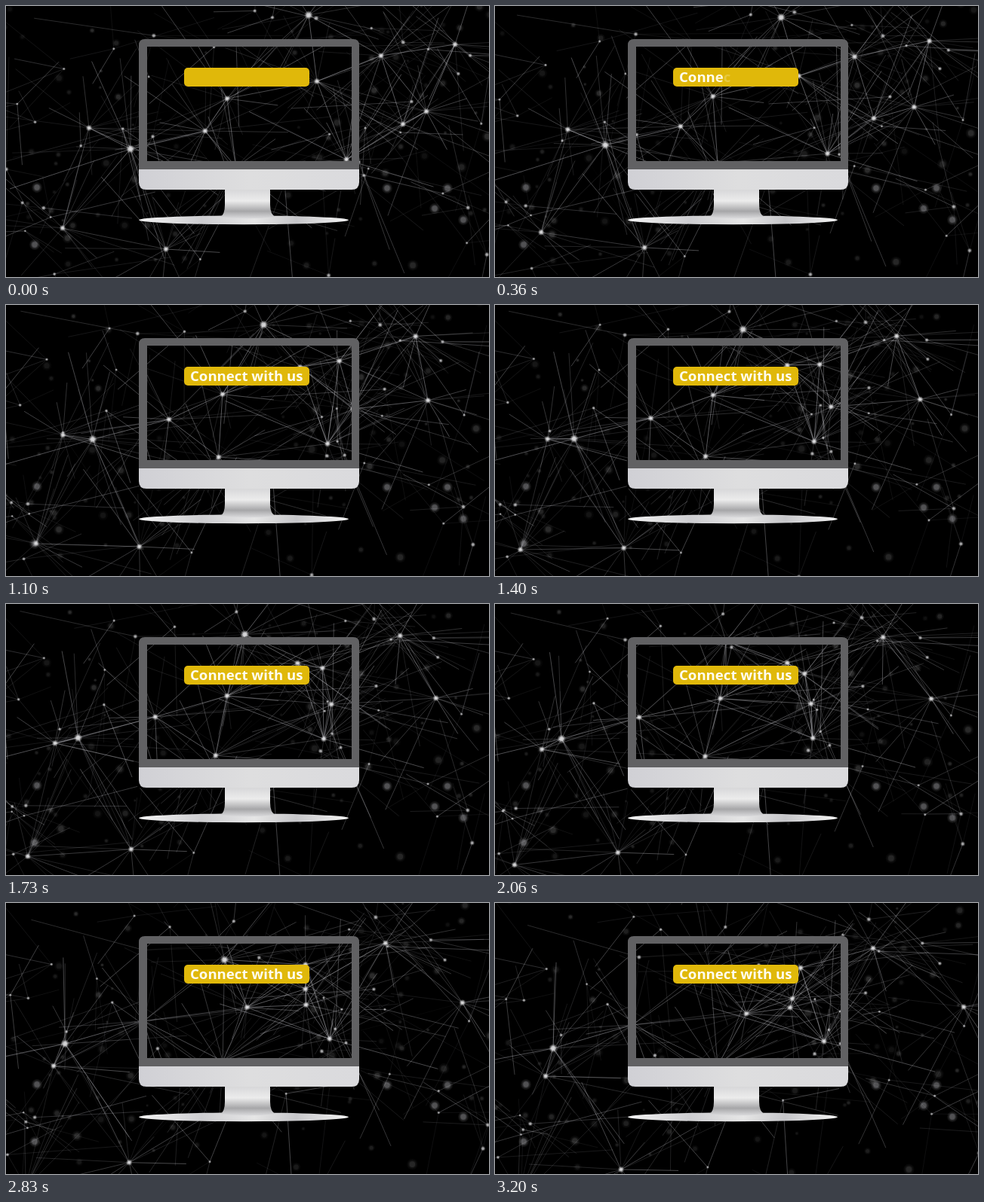
These frames come from a looping animation (640x360 px, 3.27 s). An HTML page with a canvas:

```html
<!DOCTYPE html>
<html lang="en">
<head>
<meta charset="utf-8">
<title>Connect with us</title>
<style>
  html, body { margin: 0; width: 100%; height: 100%; overflow: hidden; background: #000; }
  canvas, svg { position: absolute; left: 0; top: 0; width: 640px; height: 360px; display: block; }
  text { font: 700 18.6px "Open Sans", "Noto Sans", sans-serif; fill: #fffdf0; }
</style>
</head>
<body>
<canvas id="net" width="640" height="360"></canvas>
<svg viewBox="0 0 640 360">
  <defs>
    <linearGradient id="chin">
      <stop offset="0" stop-color="#d0d0d5"/>
      <stop offset=".5" stop-color="#dededf"/>
      <stop offset="1" stop-color="#dadadd"/>
    </linearGradient>
    <linearGradient id="neck" x2="0" y2="1">
      <stop offset="0" stop-color="#d6d6d8"/>
      <stop offset=".4" stop-color="#ececec"/>
      <stop offset=".75" stop-color="#a6a6a8"/>
      <stop offset="1" stop-color="#dcdcde"/>
    </linearGradient>
    <linearGradient id="base">
      <stop offset="0" stop-color="#f4f4f4"/>
      <stop offset=".3" stop-color="#cdcdd0"/>
      <stop offset=".55" stop-color="#e6e6e6"/>
      <stop offset=".75" stop-color="#c6c6c9"/>
      <stop offset="1" stop-color="#f4f4f4"/>
    </linearGradient>
  </defs>
  <ellipse cx="315" cy="284.3" rx="139" ry="5.9" fill="url(#base)"/>
  <path d="M290 243H350V264Q350 277 357 280Q320 285 284 280Q290 277 290 264Z" fill="url(#neck)"/>
  <path fill="#616163" fill-rule="evenodd"
    d="M176 217V52Q176 44 184 44H460Q468 44 468 52V217ZM187 54V206H458V54Z"/>
  <path d="M176 217H468V234Q468 244 458 244H186Q176 244 176 234Z" fill="url(#chin)"/>
  <rect x="236" y="82" width="166" height="25" rx="5" fill="#e0b80a"/>
  <text id="label" x="244" y="101" xml:space="preserve"></text>
</svg>
<script>
const LOOP = 3270, END = 3200;
const ctx = document.getElementById('net').getContext('2d');
const label = document.getElementById('label');

let seed = 73;
const rnd = () => (seed = (seed * 16807) % 2147483647) / 2147483647;
const spread = r => (rnd() * 2 - 1) * r;
const clamp = v => Math.max(0, Math.min(1, v));

// Bright hubs: start and end of each path
const hubs = [
  [165, 190, 77, 193], [401, 12, 285, 90], [264, 166, 182, 162],
  [557, 140, 621, 138], [595, 51, 501, 60], [526, 157, 391, 139],
  [110, 162, 67, 230], [451, 204, 436, 184], [75, 295, 30, 395],
  [497, 66, 394, 127], [293, 123, 333, 147], [412, 100, 405, 86],
  [305, 214, 295, 216], [212, 323, 167, 354]
].map(([x, y, x2, y2], i) => ({ x, y, dx: x2 - x, dy: y2 - y, r: i < 2 ? 3.6 : 2.6, rays: 13 }));

const minor = Array.from({ length: 44 }, () => ({
  x: rnd() * 640, y: rnd() * 360, dx: spread(60) - 15, dy: spread(40),
  r: 1.1 + rnd() * 1.1, rays: 4
}));

const nodes = [...hubs, ...minor];

// Long thin lines fanning out of every node
const rays = nodes.flatMap(from => Array.from({ length: from.rays }, () => {
  const angle = rnd() * 2 * Math.PI, len = 50 + rnd() * 130;
  return {
    from, x: from.x + len * Math.cos(angle), y: from.y + len * .85 * Math.sin(angle),
    dx: from.dx * .6 + spread(35), dy: from.dy * .6 + spread(25),
    alpha: (from.rays > 4 ? .16 : .1) + rnd() ** 2 * .38
  };
}));

const blobs = Array.from({ length: 90 }, (_, i) => ({
  x: (i % 2 ? 500 : 130) + spread(150), y: 175 + spread(175),
  dx: spread(30), dy: spread(16), r: 1.5 + rnd() * 3.5, alpha: .08 + rnd() * .16
}));

const bokeh = [[505, 242], [585, 242], [568, 269], [606, 284], [41, 241], [38, 317]];

const chars = [...'Connect with us'].map(c => {
  const span = document.createElementNS('http://www.w3.org/2000/svg', 'tspan');
  span.textContent = c;
  label.append(span);
  return span;
});

// Every path bows to the upper left, like a slow camera turn
function place(p, u) {
  const bow = 4 * u * (1 - u);
  return { x: p.x + p.dx * u - 22 * bow, y: p.y + p.dy * u - 14 * bow };
}

function dot({ x, y }, r, color, alpha) {
  ctx.fillStyle = color;
  for (const [k, a] of [[1.5, .25], [1.15, .4], [.8, .8]]) {
    ctx.globalAlpha = alpha * a;
    ctx.beginPath();
    ctx.arc(x, y, r * k, 0, 7);
    ctx.fill();
  }
}

function line(a, b, alpha) {
  ctx.globalAlpha = alpha;
  ctx.beginPath();
  ctx.moveTo(a.x, a.y);
  ctx.lineTo(b.x, b.y);
  ctx.stroke();
}

function draw(t) {
  const u = Math.min(t, END) / END;
  ctx.globalAlpha = 1;
  ctx.fillStyle = '#000';
  ctx.fillRect(0, 0, 640, 360);

  for (const b of blobs) dot(place(b, u), b.r, '#8c8c8c', b.alpha);
  for (const [x, y] of bokeh) dot({ x, y }, 4.6, '#8c8c90', .5);

  ctx.lineWidth = .7;
  ctx.strokeStyle = '#d2d2d8';
  for (const r of rays) line(place(r.from, u), place(r, u), r.alpha);

  const spots = hubs.map(h => place(h, u));
  spots.forEach((a, i) => spots.slice(i + 1).forEach(b => {
    const near = 1 - Math.hypot(a.x - b.x, a.y - b.y) / 190;
    if (near > 0) line(a, b, Math.min(.6, near * 1.4));
  }));

  for (const n of nodes) dot(place(n, u), n.r, '#e4e4e6', n.rays > 4 ? .9 : .65);

  chars.forEach((c, i) => c.setAttribute('fill-opacity', clamp((t - 30 - i * 62) / 90)));
}

const start = performance.now();
function tick() {
  draw((performance.now() - start) % LOOP);
  requestAnimationFrame(tick);
}
tick();
</script>
</body>
</html>
```
